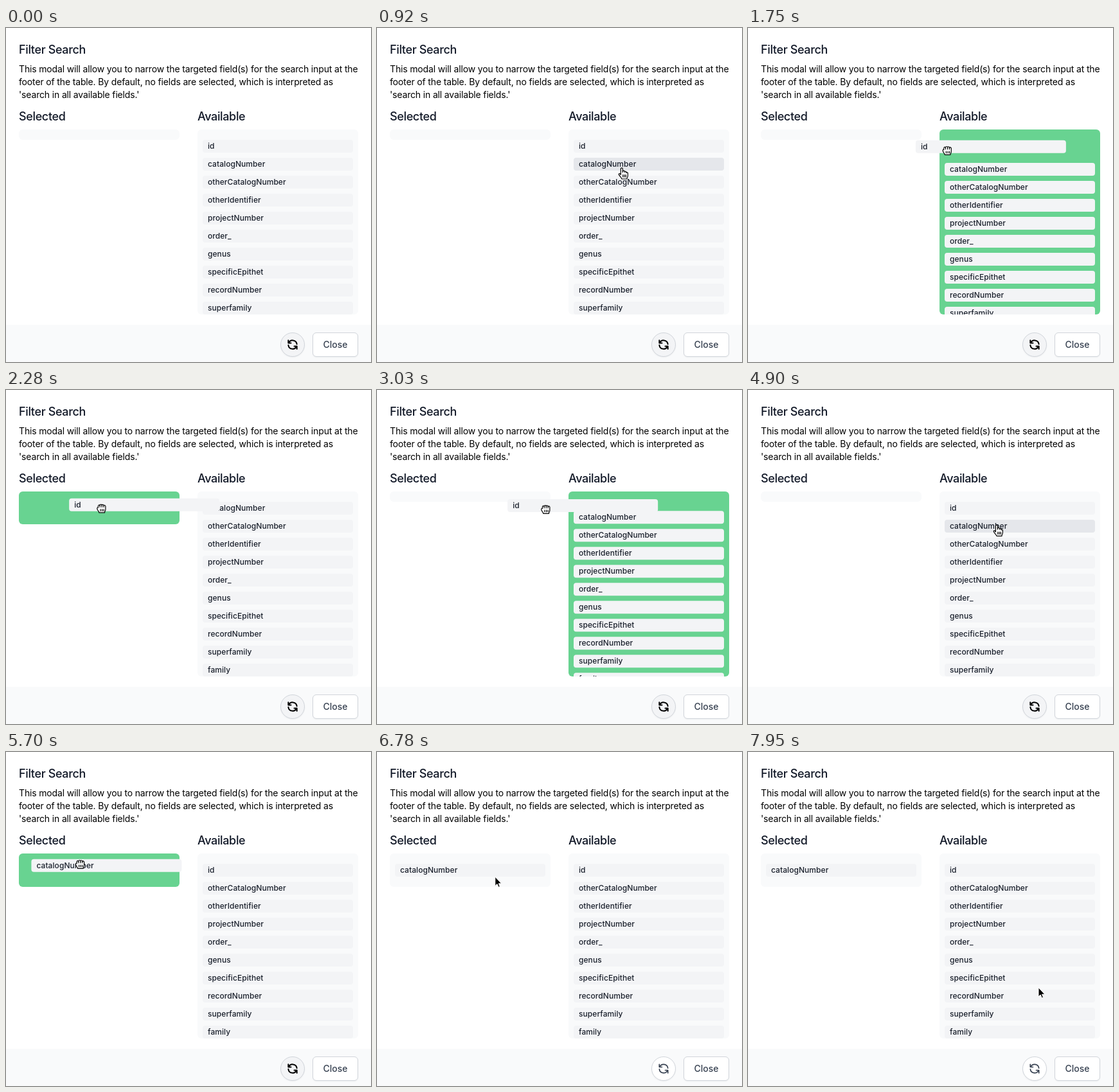
These frames come from a looping animation (568 px wide and 520 px high, 8000 ms). An HTML page:

```html
<!DOCTYPE html>
<html lang="en">
<head>
<meta charset="utf-8">
<title>Filter Search</title>
<style>
  html, body { margin: 0; width: 100%; height: 100%; overflow: hidden; background: #fff; }
  body { position: relative; font-family: Inter, "Open Sans", sans-serif; color: #111827; }
  body > *, .item { position: absolute; box-sizing: border-box; }
  h1, h2 { margin: 0; font-size: 18px; font-weight: 500; line-height: 24px; letter-spacing: -.02em; white-space: nowrap; }
  h1 { left: 20px; top: 22px; }
  h2 { top: 126px; }
  p { margin: 0; left: 20px; top: 54px; font-size: 14px; line-height: 20px; letter-spacing: -.011em; color: #000; white-space: nowrap; }
  .panel { top: 158px; width: 250px; border-radius: 6px; background: #f9fafb; overflow: hidden; }
  .panel.over { background: #68d391; }
  #selected { left: 20px; }
  #available { left: 298px; height: 288px; }
  .item {
    left: 0; top: 0; width: 234px; height: 20px; padding-left: 8px; border-radius: 4px;
    background: #f3f4f6; color: #1a202c; font-size: 12px; font-weight: 500; line-height: 20px;
    letter-spacing: .005em; white-space: nowrap;
  }
  .item.hover { background: #e5e7eb; }
  .item.lifted { z-index: 1; }
  footer { left: 0; top: 462px; width: 568px; height: 58px; background: #f9fafb; }
  .button { top: 474px; height: 38px; border: 1px solid #d1d5db; background: #fff; box-shadow: 0 1px 2px #0000000d; }
  #close { left: 477px; width: 71px; border-radius: 6px; text-align: center; font-size: 14px; font-weight: 500; line-height: 36px; color: #374151; }
  #refresh { left: 427px; width: 38px; border-radius: 50%; color: #374151; }
  #refresh.focus { background: #f3f4f6; color: #000; }
  #refresh svg { position: absolute; left: 8px; top: 8px; fill: none; stroke: currentColor; stroke-width: 2; stroke-linecap: round; stroke-linejoin: round; }
  #refresh.focus svg { stroke-width: 2.4; }
  #cursor { left: 0; top: 0; z-index: 2; width: 1px; height: 1px; overflow: visible; }
  #cursor g { display: none; fill: #fff; stroke: #000; stroke-width: 1.2; stroke-linejoin: round; stroke-linecap: round; }
  #cursor .arrow { fill: #000; stroke: #fff; stroke-width: 1; }
  #cursor[data-kind=arrow] .arrow, #cursor[data-kind=hand] .hand, #cursor[data-kind=fist] .fist { display: inline; }
</style>
</head>
<body>
<h1>Filter Search</h1>
<p>This modal will allow you to narrow the targeted field(s) for the search input at the<br>footer of the table. By default, no fields are selected, which is interpreted as<br>'search in all available fields.'</p>
<h2 style="left:20px">Selected</h2>
<h2 style="left:298px">Available</h2>
<div class="panel" id="selected"></div>
<div class="panel" id="available"></div>
<footer></footer>
<div class="button" id="refresh">
  <svg width="20" height="20" viewBox="0 0 24 24"><path d="M4 4v5h.582m15.356 2A8.001 8.001 0 004.582 9m0 0H9m11 11v-5h-.581m0 0a8.003 8.003 0 01-15.357-2m15.357 2H15"/></svg>
</div>
<div class="button" id="close">Close</div>
<div class="item" id="idItem">id</div>
<div class="item" id="catalogItem">catalogNumber</div>
<svg id="cursor">
  <g class="arrow"><path d="M0 0V14l3.2-3 2.1 4.9 2.2-.9-2-4.7H9.6Z"/></g>
  <g class="hand">
    <path d="M-1.6-.3a1.5 1.5 0 0 1 3 0V5l.2-1.2a1.4 1.4 0 0 1 2.8.2v1l.2-.4a1.3 1.3 0 0 1 2.5.4v1a1.2 1.2 0 0 1 2.3.4V9.8c0 2.8-1.5 3.2-1.5 5.6H0c-1-2.8-3-3.8-4.5-6.6-.8-1.7.9-2.4 1.9-1.2l1 1.2Z"/>
    <path d="M1.8 9v3.500M4.100 9v3.500M6.300 9v3.500"/>
  </g>
  <g class="fist">
    <path d="M-4.9-2.500C-4.900-5-2.600-5.300-2.200-3.700-2-6 .6-6 .9-4.100 1.200-5.800 3.600-5.600 3.800-3.500 4.500-4.900 6.600-4.300 6.600-2.300V2C6.600 5 5.200 4.800 5.200 7.300H-3.500C-3.500 4.500-6.500 4-6.500.8-6.500-.8-5.500-1-4.900-.6Z"/>
    <path d="M-2.200-3.700v2.400M.9-4.100v2.800M3.800-3.500v2.200M-1.300 2v2.800M1.300 2v2.800M3.800 2v2.800"/>
  </g>
</svg>
<script>
const LOOP = 8000, ENTER = 30, BLUR = 6520;
const ROW = 28, GAP = 8, ITEM_W = 234, ITEM_H = 20;
const LAG = 16;      // a held row trails the pointer
const SLIDE = 200;   // time for rows to make way

const $ = id => document.getElementById(id);
const clamp = u => Math.min(1, Math.max(0, u));
const smooth = u => u * u * (3 - 2 * u);
const easeOut = u => 1 - (1 - u) ** 2;
const mix = (a, b, u) => a + (b - a) * u;

// Where the pointer turns or rests: [time, x, y]
const stops = [
  [ENTER, 520, 498], [830, 385, 226], [1370, 361, 188], [1620, 361, 188],
  [1750, 310, 190], [2420, 106, 182], [3030, 262, 185], [3400, 362, 208],
  [3870, 364, 216], [4120, 364, 216], [4500, 400, 236], [4900, 387, 212],
  [4950, 387, 212], [5700, 115, 174], [6500, 115, 174], [7280, 306, 231], [7950, 452, 367]
];
function pointer(t) {
  const i = Math.max(1, stops.findIndex(s => s[0] > t));
  const [a, b] = t >= stops.at(-1)[0] ? stops.slice(-2) : [stops[i - 1], stops[i]];
  const u = clamp((t - a[0]) / (b[0] - a[0]));
  return [mix(a[1], b[1], u), mix(a[2], b[2], u)];
}

const drags = [
  { el: $("idItem"), lift: 1620, drop: 3400, land: 3750, settle: 4060, grab: [55, 15], end: [306, 174] },
  { el: $("catalogItem"), lift: 4950, drop: 5830, land: 6120, settle: 6280, grab: [81, 8], end: [28, 174] }
];
const isHeld = (d, t) => t >= d.lift && t < d.drop;

// Position of a row once it has been lifted.
function carried(d, t) {
  if (t >= d.settle) return d.end;
  const [px, py] = pointer(Math.max(d.lift, Math.min(t, d.drop) - LAG));
  const u = easeOut(clamp((t - d.drop) / (d.land - d.drop)));
  return [mix(px - d.grab[0], d.end[0], u), mix(py - d.grab[1], d.end[1] - GAP, u)];
}

function zoneAt(x) {
  const centre = x + ITEM_W / 2;
  return centre < 270 ? "selected" : centre > 298 ? "available" : "";
}

// Every change of drop zone, with the list layout it leads to.
const changes = [{ t: 0, zone: "", shift: 0, height: 16 }];
for (const d of drags) {
  for (let t = d.lift; t < d.drop; t++) {
    const zone = zoneAt(carried(d, t)[0]);
    if (t > d.lift && zone === changes.at(-1).zone) continue;
    changes.push({
      t, zone, hard: t === d.lift,
      shift: zone === "available" ? GAP : -ROW,
      height: zone === "selected" ? 52 : 16
    });
  }
  const last = changes.at(-1);
  changes.push({ ...last, t: d.settle, zone: "", hard: true, shift: last.zone === "selected" ? -ROW : 0 });
}
function layout(t) {
  const i = changes.findLastIndex(c => c.t <= t);
  const now = changes[i], before = changes[Math.max(0, i - 1)];
  const u = now.hard ? 1 : smooth(clamp((t - now.t) / SLIDE));
  return { zone: now.zone, shift: mix(before.shift, now.shift, u), height: mix(before.height, now.height, u) };
}

const names = ["otherCatalogNumber", "otherIdentifier", "projectNumber", "order_", "genus",
  "specificEpithet", "recordNumber", "superfamily", "family"];
const rows = names.map(name => {
  const el = document.createElement("div");
  el.className = "item";
  el.textContent = name;
  $("available").append(el);
  return el;
});

function render(t) {
  const [px, py] = pointer(t);
  const { zone, shift, height } = layout(t);
  const held = drags.some(d => isHeld(d, t));
  let hand = py >= 474 && py < 512 && px >= 427 && px < 548;

  function place(el, x, y, left = 0, top = 0) {
    el.style.transform = `translate(${x - left}px, ${y - top}px)`;
    const hit = !held && t >= ENTER && py < 446 &&
      px >= x && px < x + ITEM_W && py >= y && py < y + ITEM_H;
    el.classList.toggle("hover", hit);
    hand = hand || hit;
  }

  for (const id of ["selected", "available"]) $(id).classList.toggle("over", zone === id);
  $("selected").style.height = height + "px";
  $("refresh").classList.toggle("focus", t < BLUR);

  rows.forEach((el, i) => place(el, 306, 230 + ROW * i + shift, 298, 158));
  const home = [[306, 174], [306, 202 + shift]];
  drags.forEach((d, i) => {
    place(d.el, ...(t < d.lift ? home[i] : carried(d, t)));
    d.el.classList.toggle("lifted", t >= d.lift && t < d.settle);
  });

  $("cursor").dataset.kind = t < ENTER ? "none" : held ? "fist" : hand ? "hand" : "arrow";
  $("cursor").style.transform = `translate(${px}px, ${py}px)`;
}

function tick() {
  render(performance.now() % LOOP);
  requestAnimationFrame(tick);
}
tick();
</script>
</body>
</html>
```
